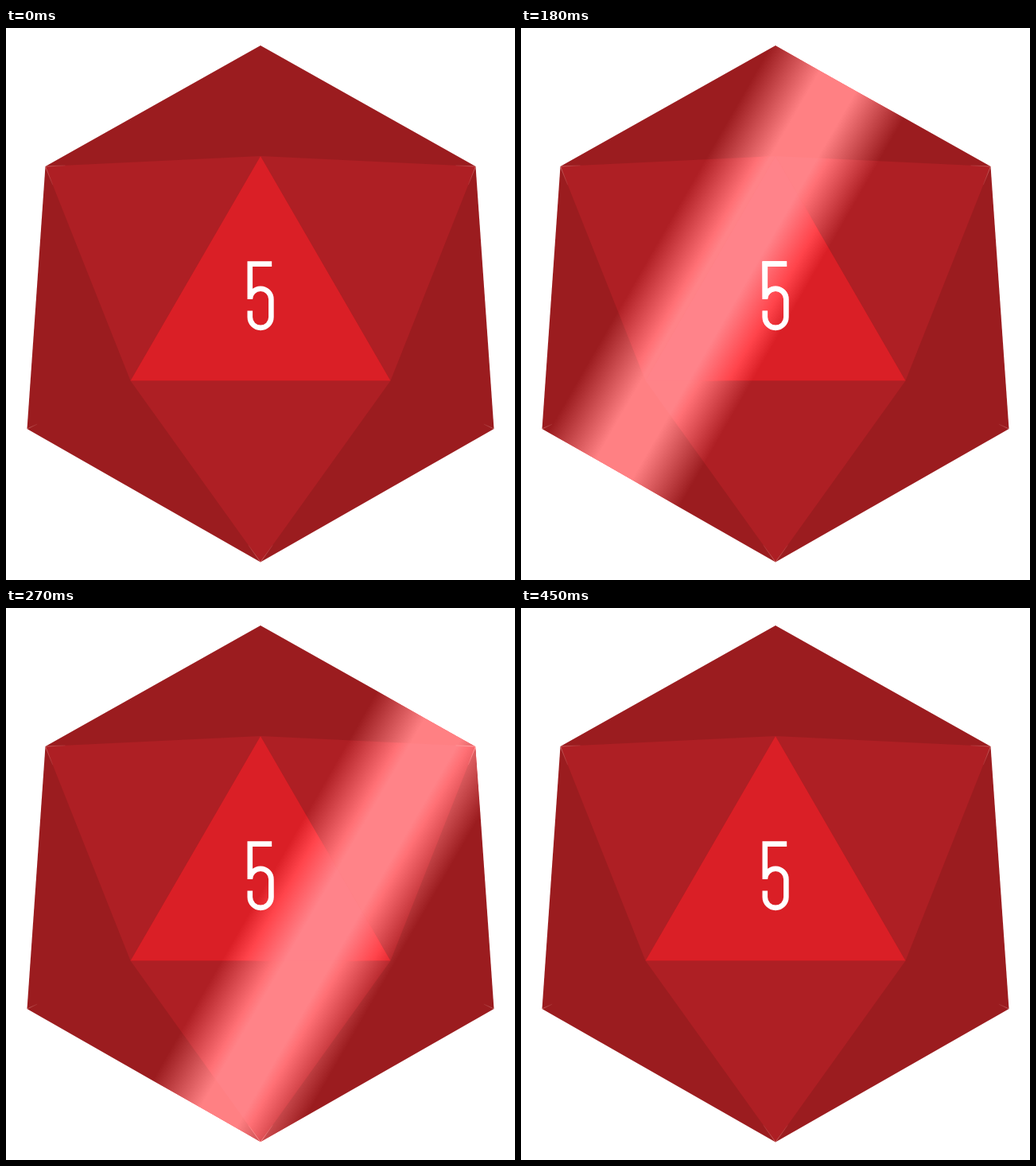
An HTML page with a canvas for the animation above (4500 ms loop, 640 by 694 pixels).

```html
<!DOCTYPE html>
<html lang="en">
<head>
<meta charset="utf-8">
<title>Twenty-sided die</title>
<style>
  html, body { margin: 0; width: 100%; height: 100%; overflow: hidden; background: #fff; }
  canvas { display: block; width: 640px; height: 694px; }
</style>
</head>
<body>
<canvas id="die" width="640" height="694" role="img" aria-label="5"></canvas>
<script>
const ctx = document.getElementById('die').getContext('2d');
const LOOP = 4500, STEP = 30;

// Outer corners, then the corners of the front face
const top_ = [320, 22], right = [590.5, 174], lowRight = [613.5, 504];
const bottom = [320, 671.5], lowLeft = [26.5, 504], left = [49.5, 174];
const apex = [320, 161], baseLeft = [156.5, 443.5], baseRight = [483.5, 443.5];

const faces = [
  ['#9b1c1f', top_, right, lowRight, bottom, lowLeft, left],
  ['#ae1f24', left, apex, baseLeft],
  ['#ae1f24', apex, right, baseRight],
  ['#ae1f24', baseLeft, baseRight, bottom],
  ['#da1f26', apex, baseRight, baseLeft]
];

// Pale seams: corner, the point they run towards, length
const seams = [
  [left, apex, 25], [left, baseLeft, 25],
  [right, apex, 25], [right, baseRight, 25],
  [lowLeft, baseLeft, 14], [lowRight, baseRight, 14],
  [bottom, baseLeft, 26], [bottom, baseRight, 26]
];

const numeral = new Path2D(
  'M334.2 296.6H306.8V339.5 M306.8 341A13.3 13.3 0 0 1 333.4 341' +
  'V363.6A13.3 13.3 0 0 1 306.8 363.6V355.5');

function drawFace([color, ...points]) {
  ctx.fillStyle = color;
  ctx.beginPath();
  points.forEach(p => ctx.lineTo(...p));
  ctx.fill();
}

function drawSeam([from, to, length]) {
  const dx = to[0] - from[0], dy = to[1] - from[1];
  const k = length / Math.hypot(dx, dy);
  const end = [from[0] + dx * k, from[1] + dy * k];
  const fade = ctx.createLinearGradient(...from, ...end);
  fade.addColorStop(0, 'rgba(255,215,205,.5)');
  fade.addColorStop(1, 'rgba(255,215,205,.12)');
  ctx.strokeStyle = fade;
  ctx.lineWidth = 0.7;
  ctx.beginPath();
  ctx.moveTo(...from);
  ctx.lineTo(...end);
  ctx.stroke();
}

// Slanted band of added light; x is where its centre meets the top edge
function drawShine(x) {
  const half = 110, dx = half * 0.75, dy = half * 0.433;
  const light = ctx.createLinearGradient(x - dx, -dy, x + dx, dy);
  [[0, 0], [0.364, 0.392], [0.636, 0.392], [1, 0]].forEach(([at, alpha]) =>
    light.addColorStop(at, `rgba(255,255,255,${alpha})`));
  ctx.globalCompositeOperation = 'lighter';
  ctx.fillStyle = light;
  ctx.fillRect(0, 0, 640, 694);
  ctx.globalCompositeOperation = 'source-over';
}

function draw(time) {
  const t = Math.floor(time % LOOP / STEP) * STEP;
  ctx.fillStyle = '#fff';
  ctx.fillRect(0, 0, 640, 694);
  faces.forEach(drawFace);
  seams.forEach(drawSeam);
  ctx.strokeStyle = '#fff';
  ctx.lineWidth = 6.6;
  ctx.stroke(numeral);
  if (t < 450) drawShine(37.5 + t * 2.22);
}

function tick() {
  draw(performance.now());
  requestAnimationFrame(tick);
}
tick();
</script>
</body>
</html>
```
